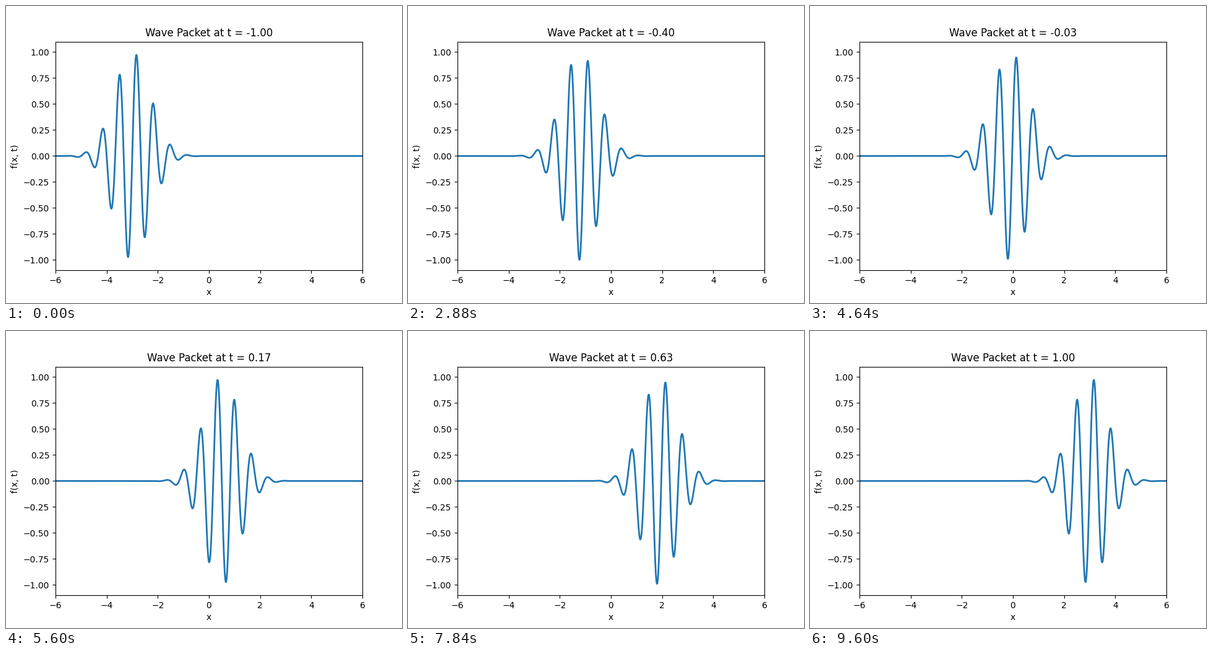
A matplotlib script for the animation above (9760 ms loop, 640x480 px).

```python
import numpy as np
import matplotlib.pyplot as plt
from matplotlib.animation import FuncAnimation

FRAMES = 61
INTERVAL = 160  # ms

x = np.linspace(-6, 6, 1000)
times = np.linspace(-1, 1, FRAMES)


def packet(x, t):
    """Gaussian envelope with group speed 3, carrier with phase speed 1."""
    return np.exp(-(x - 3 * t) ** 2) * np.sin(3 * np.pi * (x - t))


fig, ax = plt.subplots(figsize=(6.4, 4.8), dpi=100)
line, = ax.plot(x, packet(x, times[0]), lw=2)
ax.set_xlim(-6, 6)
ax.set_ylim(-1.1, 1.1)
ax.set_xlabel("x")
ax.set_ylabel("f(x, t)")
title = ax.set_title("")


def update(i):
    t = times[i]
    line.set_ydata(packet(x, t))
    title.set_text(f"Wave Packet at t = {t:.2f}")
    return line, title


anim = FuncAnimation(fig, update, frames=FRAMES, interval=INTERVAL,
                     repeat=True, repeat_delay=0, blit=False)
plt.show()
```
